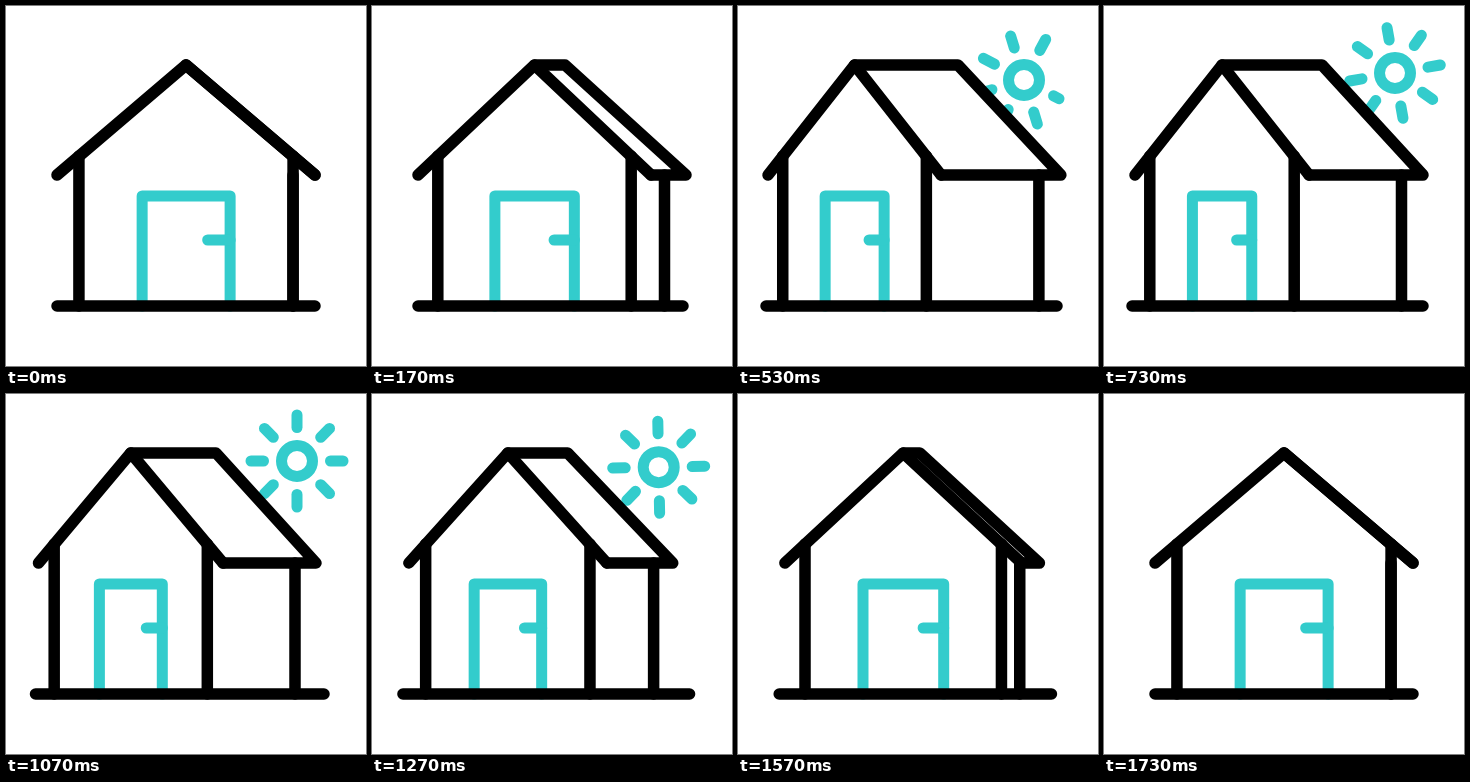
Write an HTML page with a canvas that moves like this. It is 360 px wide and 360 px high and loops after 2000 ms.

```html
<!DOCTYPE html>
<html>
<head>
<meta charset="utf-8">
<style>
  html, body { margin: 0; width: 100%; height: 100%; overflow: hidden; background: #fff; }
  canvas { display: block; }
</style>
</head>
<body>
<canvas id="stage" width="360" height="360"></canvas>
<script>
const ctx = document.getElementById('stage').getContext('2d');
const TEAL = '#33cccc', BLACK = '#000';
const LOOP = 2000, STEPS = 60;

// Smooth monotone curve through (times, values), flat at both ends.
function track(times, values) {
  const last = times.length - 1;
  const rate = i => (values[i + 1] - values[i]) / (times[i + 1] - times[i]);
  const slopes = values.map((_, i) => {
    if (i === 0 || i === last) return 0;
    const a = rate(i - 1), b = rate(i);
    return a * b > 0 ? 2 * a * b / (a + b) : 0;
  });
  return t => {
    if (t <= times[0]) return values[0];
    if (t >= times[last]) return values[last];
    let i = 0;
    while (t >= times[i + 1]) i++;
    const h = times[i + 1] - times[i], u = (t - times[i]) / h, v = 1 - u;
    return v * v * ((1 + 2 * u) * values[i] + u * h * slopes[i])
         + u * u * ((1 + 2 * v) * values[i + 1] - v * h * slopes[i + 1]);
  };
}

const turn = [0, 5, 11, 15, 22, 32, 43, 52];
const house = {
  left:      track(turn, [51, 46, 33, 30, 31, 32.5, 42, 51]),
  right:     track(turn, [309, 279, 214, 203, 205, 217, 256, 309]),
  ridge:     track(turn, [180, 193, 218, 220, 218, 210, 185, 180]),
  back:      track(turn, [309, 314, 322, 323, 319, 310, 296, 309]),
  backWall:  track(turn, [287, 292.5, 300, 301, 297.5, 289, 278, 287]),
  baseLeft:  track(turn, [51, 46, 32.5, 28, 28, 29.5, 33, 51]),
  baseRight: track(turn, [309, 311, 317, 319, 319, 318, 317, 309])
};

const travel = [6, 11, 16, 18, 36, 43, 48];
const sun = {
  x: track(travel, [225, 254, 286, 291, 291, 258, 225]),
  y: track(travel, [175, 127, 74, 67, 67, 115, 165]),
  tilt: track([11, 22, 32, 43], [20, 10, 0, 2])
};

const clamp = v => Math.max(0, Math.min(1, v));

function line(color, width, ...points) {
  ctx.beginPath();
  points.forEach(([x, y]) => ctx.lineTo(x, y));
  ctx.strokeStyle = color;
  ctx.lineWidth = width;
  ctx.stroke();
}

function mask(...points) {
  ctx.beginPath();
  points.forEach(([x, y]) => ctx.lineTo(x, y));
  ctx.fillStyle = '#fff';
  ctx.fill();
}

function drawSun(t) {
  if (t < 8 || t > 48) return;
  ctx.save();
  ctx.translate(sun.x(t), sun.y(t));
  ctx.beginPath();
  ctx.arc(0, 0, 15.5, 0, 2 * Math.PI);
  ctx.strokeStyle = TEAL;
  ctx.lineWidth = 11;
  ctx.stroke();
  ctx.rotate(-sun.tilt(t) * Math.PI / 180);
  // Rays grow and shrink one after another, counter-clockwise.
  for (let i = 0; i < 8; i++) {
    ctx.rotate(-Math.PI / 4);
    const size = clamp((t - 9 - i) / 2) * clamp((41.5 + i - t) / 2);
    if (size > 0) line(TEAL, 11, [33.5, 0], [33.5 + 12.5 * size, 0]);
  }
  ctx.restore();
}

function drawHouse(t) {
  const p = {};
  for (const key in house) p[key] = house[key](t);
  const across = f => p.left + f * (p.right - p.left);
  const top = 59, eave = 169, ground = 300, wallTop = 150;
  const apex = [across(.5), top], wallL = across(.085), wallR = across(.915);
  const leftEave = [p.left, eave], rightEave = [p.right, eave];
  const ridge = [p.ridge, top], backEave = [p.back, eave];

  mask(apex, ridge, backEave, [p.backWall, eave], [p.backWall, ground],
       [wallL, ground], [wallL, wallTop]);

  const doorL = across(.33), doorR = across(.671);
  line(TEAL, 11, [doorL, ground], [doorL, 190], [doorR, 190], [doorR, ground]);
  line(TEAL, 11, [across(.584), 234], [doorR, 234]);

  line(BLACK, 11.5, [wallL, wallTop], [wallL, ground]);
  line(BLACK, 11.5, [wallR, wallTop], [wallR, ground]);
  line(BLACK, 11.5, [p.backWall, eave], [p.backWall, ground]);
  line(BLACK, 11.5, apex, ridge, backEave, rightEave);
  line(BLACK, 11.5, leftEave, apex, rightEave);
  line(BLACK, 11.5, [p.baseLeft, ground], [p.baseRight, ground]);
}

const start = performance.now();

function draw() {
  const ms = (performance.now() - start) % LOOP;
  // The motion advances in 30 steps per second.
  const t = Math.floor((ms + 5) * STEPS / LOOP) % STEPS;
  ctx.clearRect(0, 0, 360, 360);
  ctx.lineCap = ctx.lineJoin = 'round';
  drawSun(t);
  drawHouse(t);
  requestAnimationFrame(draw);
}
draw();
</script>
</body>
</html>
```
